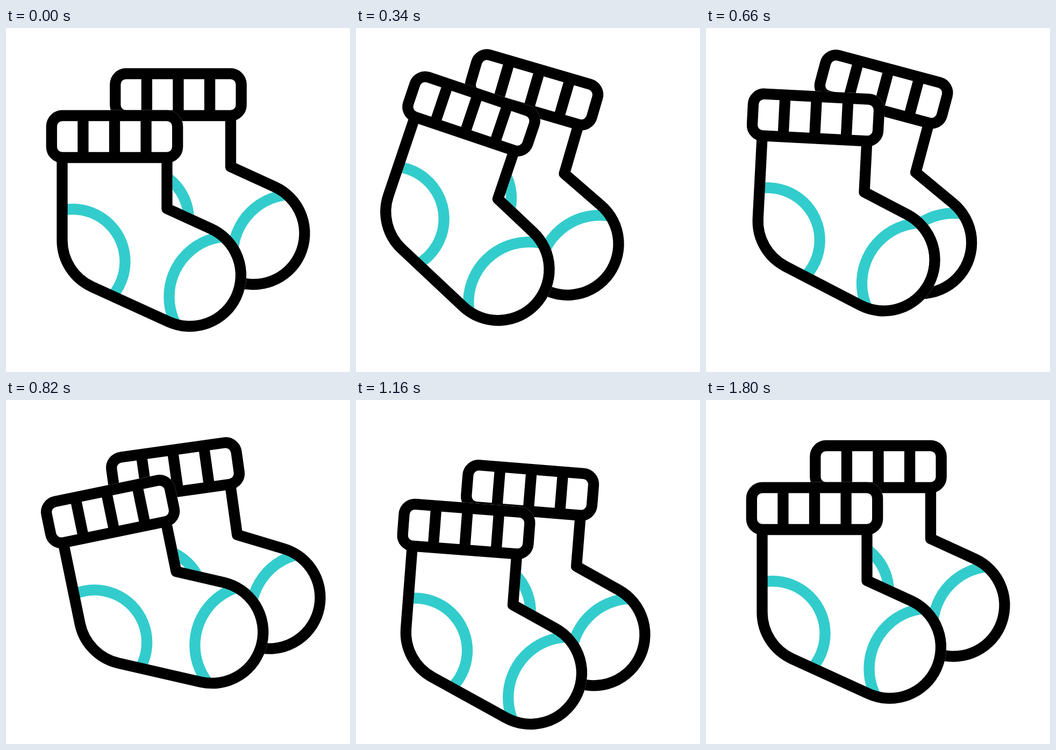
These frames come from a looping animation (640 px wide and 640 px high, 2400 ms). An HTML page with a canvas:

```html
<!DOCTYPE html>
<html lang="en">
<head>
<meta charset="utf-8">
<title>Socks</title>
<style>
html, body { margin: 0; width: 100%; height: 100%; overflow: hidden; background: #fff; }
canvas { display: block; width: 100%; height: 100%; }
</style>
</head>
<body>
<canvas id="stage" width="640" height="640"></canvas>
<script>
const ctx = document.getElementById('stage').getContext('2d');
const LOOP = 2400;
const LINE = 20.3;
const PIVOT = { x: 202, y: 241 };
const TILT = 0.428; // slope of the sole

// Keys are [time in ms, value]; the swing halves each time.
const SWING = [[0, 0], [489, 24], [796, -12], [1085, 6], [1360, -3], [1580, 0]];
const SOCKS = [
  { x: 118.5, y: -78, pace: 1.12, lift: [[0, 0], [495, -16], [1054, 44], [1607, 0]] },
  { x: 0, y: 0, pace: 1, lift: [[0, 0], [490, -57], [1056, 42], [1605, 0]] }
];

function valueAt(keys, t) {
  for (let i = 1; i < keys.length; i++) {
    const [t0, a] = keys[i - 1], [t1, b] = keys[i];
    if (t < t1) {
      const u = (t - t0) / (t1 - t0);
      return a + (b - a) * u * u * (3 - 2 * u);
    }
  }
  return keys[keys.length - 1][1];
}

function bodyPath() {
  const p = new Path2D();
  p.moveTo(104.5, 241);
  p.lineTo(104.5, 395);
  p.arc(199.5, 395, 95, Math.PI, Math.PI / 2 + TILT, true);
  p.arc(342, 460, 95, Math.PI / 2 + TILT, -Math.PI / 2 + TILT, true);
  p.lineTo(299.5, 336);
  p.lineTo(299.5, 241);
  return p;
}

function cuffPath() {
  const p = new Path2D(), x = 84.8, y = 163, w = 234.4, h = 78, r = 20;
  p.moveTo(x + r, y);
  p.arcTo(x + w, y, x + w, y + h, r);
  p.arcTo(x + w, y + h, x, y + h, r);
  p.arcTo(x, y + h, x, y, r);
  p.arcTo(x, y, x + w, y, r);
  p.closePath();
  return p;
}

function ribPath() {
  const p = new Path2D();
  for (let i = 1; i < 4; i++) {
    p.moveTo(84.8 + i * 58.6, 163);
    p.lineTo(84.8 + i * 58.6, 241);
  }
  return p;
}

function circlePath(x, y, r) {
  const p = new Path2D();
  p.arc(x, y, r, 0, Math.PI * 2);
  return p;
}

const body = bodyPath(), cuff = cuffPath(), ribs = ribPath();
const patches = [circlePath(124, 434.5, 97.5), circlePath(416, 500, 112.5)];

function stroke(color, ...paths) {
  ctx.strokeStyle = color;
  paths.forEach(p => ctx.stroke(p));
}

function drawSock(sock, t) {
  const time = t / sock.pace;
  ctx.save();
  ctx.translate(sock.x + PIVOT.x, sock.y + PIVOT.y + valueAt(sock.lift, time));
  ctx.rotate(valueAt(SWING, time) * Math.PI / 180);
  ctx.translate(-PIVOT.x, -PIVOT.y);

  ctx.fillStyle = '#fff';
  ctx.fill(body);
  ctx.fill(cuff);
  stroke('#fff', body, cuff);

  ctx.save();
  ctx.clip(body);
  stroke('#33cccc', ...patches);
  ctx.restore();

  stroke('#000', body, cuff, ribs);
  ctx.restore();
}

function draw(now) {
  const t = now % LOOP;
  ctx.fillStyle = '#fff';
  ctx.fillRect(0, 0, 640, 640);
  ctx.lineWidth = LINE;
  ctx.lineJoin = 'round';
  SOCKS.forEach(sock => drawSock(sock, t));
}

let start = null;
function tick(now) {
  if (start === null) start = now;
  draw(now - start);
  requestAnimationFrame(tick);
}
draw(0);
requestAnimationFrame(tick);
</script>
</body>
</html>
```
